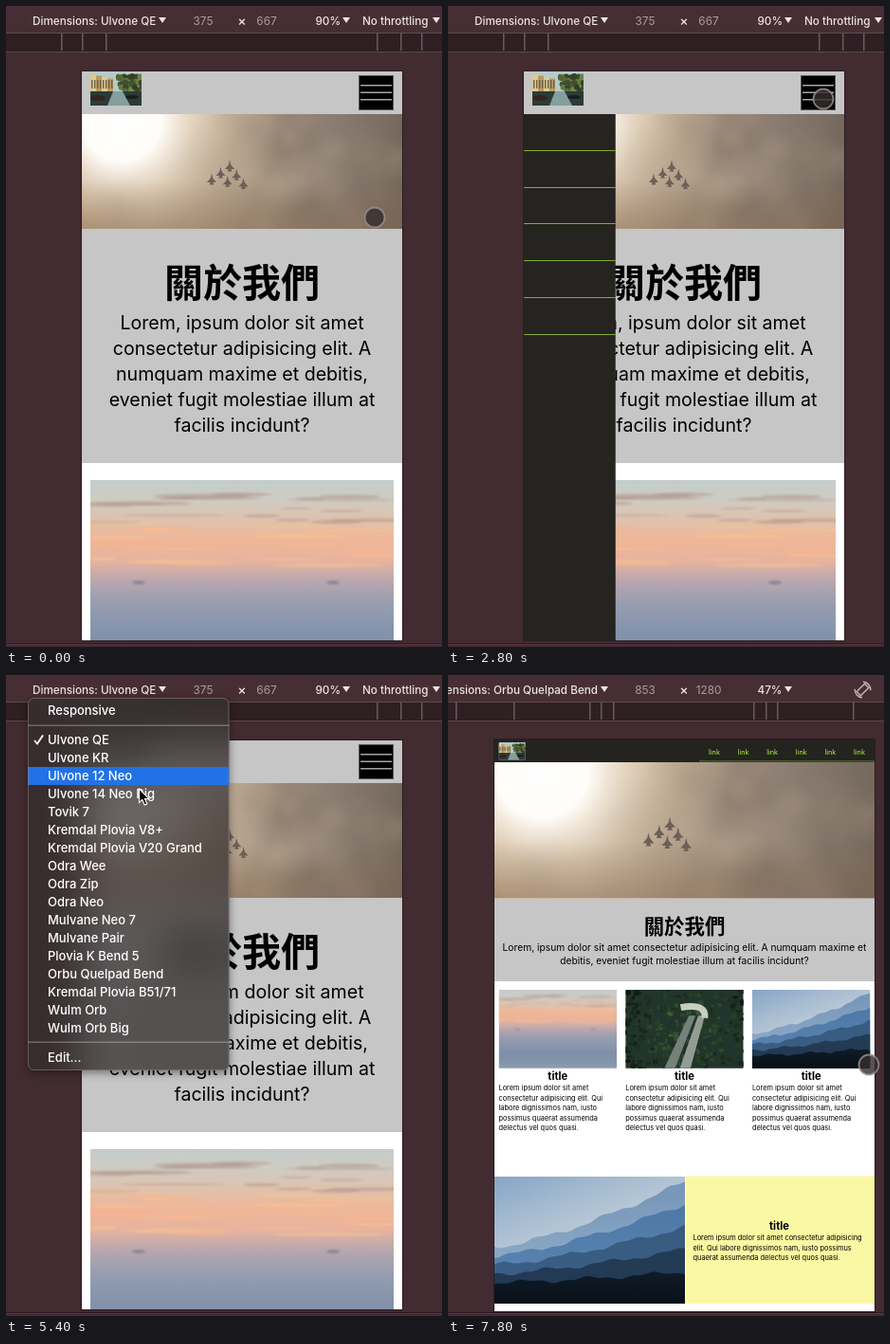
An HTML page with a canvas for the animation above (8000 ms loop, 460x676 px).

```html
<!DOCTYPE html>
<html lang="zh-Hant">
<head>
<meta charset="utf-8">
<title>Responsive page preview</title>
<style>
html, body { margin: 0; width: 100%; height: 100%; overflow: hidden; background: #422b31; }
canvas { display: block; }
</style>
</head>
<body>
<canvas id="stage" width="460" height="676"></canvas>
<script>
const W = 460, H = 676, LOOP = 8000, STEP = 200, CENTER = 249;
const stage = document.getElementById('stage');
const screen = stage.getContext('2d');
const layer = document.createElement('canvas');
layer.width = W;
layer.height = H;
let c = screen;

const SANS = 'Inter, Roboto, sans-serif';
const CJK = '"Noto Sans CJK TC", "Noto Sans CJK", sans-serif';

const DEVICES = ['Ulvone QE', 'Ulvone KR', 'Ulvone 12 Neo', 'Ulvone 14 Neo Big', 'Tovik 7',
  'Kremdal Plovia V8+', 'Kremdal Plovia V20 Grand', 'Odra Wee', 'Odra Zip', 'Odra Neo',
  'Mulvane Neo 7', 'Mulvane Pair', 'Plovia K Bend 5', 'Orbu Quelpad Bend',
  'Kremdal Plovia B51/71', 'Wulm Orb', 'Wulm Orb Big'];
const PICK = 13;

const PHONE = { x: 80, y: 69, w: 338, h: 600, zoom: 0.9 };
const TABLET = { x: 49, y: 68, w: 401, h: 603, zoom: 0.47 };

// Pointer stops: each move takes from `from` to `to`.
const START = { x: 389, y: 223 };
const MOVES = [
  { from: 200, to: 800, x: 396, y: 98 },
  { from: 3100, to: 4000, x: 178, y: 14 },
  { from: 4000, to: 4600, x: 158, y: 17 },
  { from: 4800, to: 5400, x: 140, y: 120 },
  { from: 5400, to: 6200, x: 153, y: 307 },
  { from: 6800, to: 7800, x: 444, y: 411 }
];

const clamp = v => Math.min(1, Math.max(0, v));
const mix = (a, b, p) => a + (b - a) * p;
const smooth = v => { v = clamp(v); return v * v * (3 - 2 * v); };
const times = (n, fn) => Array.from({ length: n }, (_, i) => fn(i));

function pointer(t) {
  return MOVES.reduce((at, m) => {
    const p = clamp((t - m.from) / (m.to - m.from));
    return { x: mix(at.x, m.x, p), y: mix(at.y, m.y, p) };
  }, START);
}

function seeded(s) {
  return () => (s = (s * 16807) % 2147483647) / 2147483647;
}

function rect(x, y, w, h, fill) {
  c.fillStyle = fill;
  c.fillRect(x, y, w, h);
}

function poly(points, fill) {
  c.beginPath();
  points.forEach(([x, y]) => c.lineTo(x, y));
  c.closePath();
  c.fillStyle = fill;
  c.fill();
}

function oval(x, y, rx, ry, fill) {
  c.beginPath();
  c.ellipse(x, y, rx, ry, 0, 0, 7);
  c.fillStyle = fill;
  c.fill();
}

function text(s, x, y, size, { fill = '#000', font = SANS, weight = 400, align = 'left' } = {}) {
  c.font = `${weight} ${size}px ${font}`;
  c.textAlign = align;
  c.fillStyle = fill;
  c.fillText(s, x, y);
}

function lines(list, x, y, gap, size, opt) {
  list.forEach((s, i) => text(s, x, y + gap * i, size, opt));
}

// Colours are spread evenly along a gradient.
function spread(g, colors) {
  colors.forEach((color, i) => g.addColorStop(i / (colors.length - 1), color));
  return g;
}
const ramp = (x0, y0, x1, y1, ...colors) => spread(c.createLinearGradient(x0, y0, x1, y1), colors);
const glow = (x, y, r, ...colors) => spread(c.createRadialGradient(x, y, 0, x, y, r), colors);

// Draws a picture in its own units, scaled to the given width.
function picture(draw, x, y, w, uw, uh) {
  c.save();
  c.translate(x, y);
  c.scale(w / uw, w / uw);
  c.beginPath();
  c.rect(0, 0, uw, uh);
  c.clip();
  draw();
  c.restore();
}

function jet(x, y) {
  const half = [[0, -6.5], [1.2, -1.5], [5, 3], [1.4, 3], [2.4, 5.5]];
  const mirror = half.map(([px, py]) => [-px, py]).reverse();
  poly([...half, ...mirror].map(([px, py]) => [x + px, y + py]), '#6c6058');
}

function hero() {
  rect(0, 0, 338, 121, ramp(0, 20, 338, 60, '#b0957a', '#b5a089', '#ac9985', '#8c7e72', '#73665b'));
  const rnd = seeded(77);
  for (let i = 0; i < 40; i++) {
    const tone = i % 2 ? '235,210,180' : '90,75,64';
    rect(0, 0, 338, 121, glow(rnd() * 338, rnd() * 121, 15 + rnd() * 30, `rgba(${tone},.1)`, `rgba(${tone},0)`));
  }
  rect(0, 0, 338, 121, glow(42, 8, 165, '#fff', '#fffdf8', 'rgba(248,234,212,.55)',
    'rgba(232,212,185,.18)', 'rgba(225,200,170,0)'));
  rect(0, 0, 338, 121, ramp(0, 70, 0, 121, 'rgba(135,105,75,0)', 'rgba(135,105,75,.35)'));
  for (let a = 0; a < 3; a++) {
    for (let b = 0; a + b < 3; b++) jet(156 - 9.5 * a + 7.25 * b, 55 + 7 * a + 9.25 * b);
  }
}

function sunset() {
  rect(0, 0, 320, 214, ramp(0, 0, 0, 213, '#c3cdcb', '#cfcbc2', '#dfc2ac', '#f0b697', '#e6b3a0',
    '#b9a7ae', '#9a9eb0', '#8a97ae', '#8090a9', '#8292a9', '#8f9db1'));
  const rnd = seeded(19);
  c.filter = 'blur(1px)';
  for (let i = 0; i < 44; i++) {
    const y = 15 + 78 * rnd(), warm = y > 45;
    const fill = warm ? `rgba(255,${170 + 35 * rnd()},140,.4)` : 'rgba(166,131,124,.4)';
    oval(rnd() * 320, y, 15 + rnd() * 45, 0.8 + rnd() * 1.6, fill);
  }
  [51, 256].forEach(x => oval(x, 108, 7, 2, '#8c8799'));
  c.filter = 'none';
}

function forest() {
  rect(0, 0, 320, 214, '#22352c');
  const rnd = seeded(41);
  for (let i = 0; i < 320; i++) {
    const x = rnd() * 320, y = rnd() * 213;
    const edge = Math.hypot(x - 170, y - 110) / 200;
    oval(x, y, 3 + rnd() * 6, 3 + rnd() * 5, `hsl(${100 + 50 * edge},25%,${mix(30, 10, edge) * (0.6 + 0.6 * rnd())}%)`);
  }
  // Two lanes run from the lower left up to the pale arch.
  [[0, '#75817b'], [42, '#929c94']].forEach(([dx, fill]) =>
    poly([[105 + dx, 214], [172 + dx * 0.6, 70], [190 + dx * 0.6, 70], [134 + dx, 214]], fill));
  c.strokeStyle = '#c9cfbf';
  c.lineWidth = 18;
  c.beginPath();
  c.moveTo(150, 48);
  c.quadraticCurveTo(220, 35, 215, 76);
  c.stroke();
}

function mountains() {
  rect(0, 0, 320, 214, ramp(0, 0, 60, 160, '#86a5c6', '#a8bdd1', '#c4d0da'));
  for (let i = 0; i < 5; i++) {
    const crest = times(41, k => {
      const x = k * 8;
      const bumps = 3 * Math.sin(x / 17 + i * 2) + 1.5 * Math.sin(x / 6 + i);
      return [x, mix(118 + 15 * i, 8 + 38 * i, (x / 320) ** 1.4) + bumps];
    });
    const tone = (dl) => `hsl(211,${33 + 3 * i}%,${60 - 12 * i + dl}%)`;
    poly([...crest, [320, 214], [0, 214]], ramp(0, 30 + 30 * i, 0, 214, tone(0), tone(10 - 4 * i)));
  }
}

function canal() {
  rect(0, 0, 54, 36, '#b5cbc9');
  times(4, i => rect(i * 6, 3 + i * 1.5, 6, 20, i % 2 ? '#b99a62' : '#dccb8c'));
  times(8, i => rect(1 + i * 3, 9, 1.4, 9, '#6b624c'));
  const rnd = seeded(8);
  times(40, () => oval(30 + rnd() * 24, 5 + rnd() * 16, 3, 3, `hsl(85,28%,${18 + rnd() * 25}%)`));
  rect(0, 21, 54, 15, '#2c3b38');
  poly([[24, 21], [34, 21], [42, 36], [18, 36]], '#83a09c');
  oval(8, 28, 8, 3, '#33251f');
  oval(44, 27, 7, 2, '#161f1f');
}

const LOREM = ['Lorem ipsum dolor sit amet', 'consectetur adipisicing elit. Qui',
  'labore dignissimos nam, iusto', 'possimus quaerat assumenda', 'delectus vel quos quasi.'];
const MIDDLE = { align: 'center' };
const TITLE = { align: 'center', weight: 700 };
const HEADING = { ...TITLE, font: CJK };

function phonePage(open) {
  const { x, y, w, h } = PHONE;
  rect(x, y, w, h, '#fff');
  rect(x, y, w, 413, '#c6c6c6');
  picture(canal, 89, 69, 54, 54, 36);
  rect(372, 73, 37, 37, '#555');
  rect(373, 74, 35, 35, '#000');
  times(3, i => rect(374, 83 + i * 7.5, 33, 1.5, '#a5a5a5'));
  picture(hero, x, 114, w, 338, 121);
  text('關於我們', CENTER, 306.5, 41, HEADING);
  lines(['Lorem, ipsum dolor sit amet', 'consectetur adipisicing elit. A', 'numquam maxime et debitis,',
    'eveniet fugit molestiae illum at', 'facilis incidunt?'], CENTER, 341, 27, 19.6, MIDDLE);
  picture(sunset, 89, 500, 320, 320, 213);
  if (open > 0) sideMenu(open);
}

function sideMenu(open) {
  const left = 80 - 264 * (1 - open);
  rect(left, 114, 264, 555, '#252420');
  for (let i = 0; i < 6; i++) {
    text('link', left + 12, 138 + i * 38.7, 14, { fill: '#adf54b' });
    rect(left, 152 + Math.round(i * 38.7), 264, 1, '#7fae36');
  }
}

function tabletPage() {
  const { x, y, w, h } = TABLET;
  const mid = x + w / 2;
  rect(x, y, w, h, '#fff');
  rect(x, y, w, 24, '#242320');
  picture(canal, 53.5, 71, 28.3, 54, 36);
  times(6, i => text('link', 281 + i * 30.6, 84, 7.3, { ...MIDDLE, fill: '#adf54b' }));
  rect(265, 90.5, 185, 0.8, '#6a9130');
  picture(hero, x, 92, w, 338, 121.4);
  rect(x, 236, w, 87, '#c6c6c6');
  text('關於我們', mid, 273, 21.4, HEADING);
  lines(['Lorem, ipsum dolor sit amet consectetur adipisicing elit. A numquam maxime et',
    'debitis, eveniet fugit molestiae illum at facilis incidunt?'], mid, 291, 14, 10.25, MIDDLE);
  [sunset, forest, mountains].forEach((draw, i) => {
    const left = 53.5 + i * 133.7;
    picture(draw, left, 332, 124.5, 320, 213);
    text('title', left + 62.3, 427, 11.2, TITLE);
    lines(LOREM, left, 438, 10.5, 7.4);
  });
  picture(mountains, x, 529, 201, 320, 213);
  rect(251, 528.5, 199, 134.5, '#fbf8a3');
  text('title', 349.5, 585, 11.2, TITLE);
  lines(['Lorem ipsum dolor sit amet consectetur adipisicing', 'elit. Qui labore dignissimos nam, iusto possimus',
    'quaerat assumenda delectus vel quos quasi.'], 258.5, 596, 10.5, 7.4);
}

function caret(x) {
  poly([[x, 12], [x + 8, 12], [x + 4, 18]], '#eee4e6');
}

function rotateIcon() {
  c.save();
  c.translate(437.5, 15.5);
  c.rotate(Math.PI / 4);
  c.strokeStyle = '#c3b6b9';
  c.lineWidth = 1.4;
  c.strokeRect(-3, -6, 6, 12);
  [-2.3, 0.85].forEach(a => {
    c.beginPath();
    c.arc(0, 0, 8.3, a, a + 1.6);
    c.stroke();
  });
  c.restore();
}

function toolbar(tablet) {
  const { zoom } = tablet ? TABLET : PHONE;
  const bright = { weight: 500, fill: '#eee4e6' };
  const dim = { ...MIDDLE, fill: '#aa9ea2' };
  rect(0, 0, W, H, '#422b31');
  rect(0, 0, W, 28, '#462e34');
  rect(0, 28, W, 1, '#604a4f');
  rect(0, 29, W, 19, '#2e1f23');
  rect(0, 48, W, 1, '#5d464b');
  [320, 375, 425, 768, 1024].forEach(size => {
    const half = size * zoom / 2;
    rect(Math.round(CENTER - half), 29, 1.5, 18, '#6d595e');
    rect(Math.round(CENTER + half - 2), 29, 1.5, 18, '#6d595e');
  });
  rect(0, 672, W, 1, '#2b1b1f');
  rect(0, 673, W, 1, '#56383f');
  if (tablet) text('Dimensions: ' + DEVICES[PICK], 158, 20, 11.7, { ...bright, align: 'right' });
  else text('Dimensions: ' + DEVICES[0], 28, 20, 11.7, bright);
  caret(161);
  text(tablet ? '853' : '375', 208, 20, 11.8, dim);
  text('×', CENTER, 20.5, 14, { ...bright, ...MIDDLE });
  text(tablet ? '1280' : '667', 275, 20, 11.8, dim);
  text(tablet ? '47%' : '90%', 326.5, 20, 11.7, bright);
  caret(355);
  if (tablet) rotateIcon();
  else {
    text('No throttling', 376, 20, 11.7, bright);
    caret(450);
  }
}

function dropdown(row, alpha) {
  c = layer.getContext('2d');
  c.clearRect(0, 0, W, H);
  c.save();
  c.beginPath();
  c.roundRect(23, 24, 212.5, 393, 6);
  c.clip();
  c.filter = 'blur(22px)';
  c.drawImage(stage, 0, 0);
  c.filter = 'none';
  rect(23, 24, 213, 393, 'rgba(52,47,46,.72)');
  if (row >= 0) rect(23, 59 + row * 19, 213, 19, '#2272e6');
  [53, 387].forEach(y => rect(23, y - 0.5, 213, 1.5, 'rgba(255,255,255,.28)'));
  const label = { weight: 500, fill: '#fff' };
  text('Responsive', 44, 41.7, 13, label);
  lines(DEVICES, 44, 72.7, 19, 13, label);
  text('Edit...', 44, 407.7, 13, label);
  c.strokeStyle = '#fff';
  c.lineWidth = 1.9;
  c.beginPath();
  c.moveTo(30, 69);
  c.lineTo(33, 72.5);
  c.lineTo(39, 63.5);
  c.stroke();
  c.restore();
  c.strokeStyle = 'rgba(150,140,140,.5)';
  c.lineWidth = 1;
  c.beginPath();
  c.roundRect(23.5, 24.5, 211.5, 392, 6);
  c.stroke();

  c = screen;
  c.save();
  c.globalAlpha = alpha;
  c.shadowColor = 'rgba(0,0,0,.4)';
  c.shadowBlur = 8;
  c.shadowOffsetY = 3;
  c.drawImage(layer, 0, 0);
  c.restore();
}

function arrow({ x, y }) {
  c.save();
  c.translate(x, y);
  poly([[0.5, 0], [0.5, 14.5], [3.8, 11.5], [6.2, 17], [8.8, 15.9], [6.4, 10.6], [10.8, 10.4]], '#000');
  c.strokeStyle = '#fff';
  c.lineWidth = 1.1;
  c.stroke();
  c.restore();
}

function touch({ x, y }) {
  oval(x, y, 10.5, 10.5, 'rgba(52,45,45,.82)');
  c.strokeStyle = 'rgba(150,140,137,.85)';
  c.lineWidth = 1.8;
  c.stroke();
}

function draw(t) {
  c = screen;
  const tablet = t >= 7000;
  const page = tablet ? TABLET : PHONE;
  const at = pointer(t);
  toolbar(tablet);
  c.strokeStyle = 'rgba(25,14,18,.5)';
  c.lineWidth = 2;
  c.strokeRect(page.x, page.y, page.w, page.h);
  c.save();
  c.beginPath();
  c.rect(page.x, page.y, page.w, page.h);
  c.clip();
  if (tablet) tabletPage();
  else phonePage(smooth((t - 1000) / 500) - smooth((t - 2505) / 500));
  c.restore();

  const listed = t >= 4600 && t < 6800;
  if (listed) {
    // The highlight trails the pointer slightly.
    const row = Math.floor((pointer(t - 100).y - 59) / 19);
    dropdown(row, t >= 6600 ? 0.65 : 1);
  }
  const inside = at.y > page.y && at.x > page.x && at.x < page.x + page.w;
  (inside && !listed ? touch : arrow)(at);
}

let shown = -1;
function tick(now) {
  const t = Math.floor((now % LOOP) / STEP) * STEP;
  if (t !== shown) {
    shown = t;
    draw(t);
  }
  requestAnimationFrame(tick);
}
draw(0);
requestAnimationFrame(tick);
</script>
</body>
</html>
```
